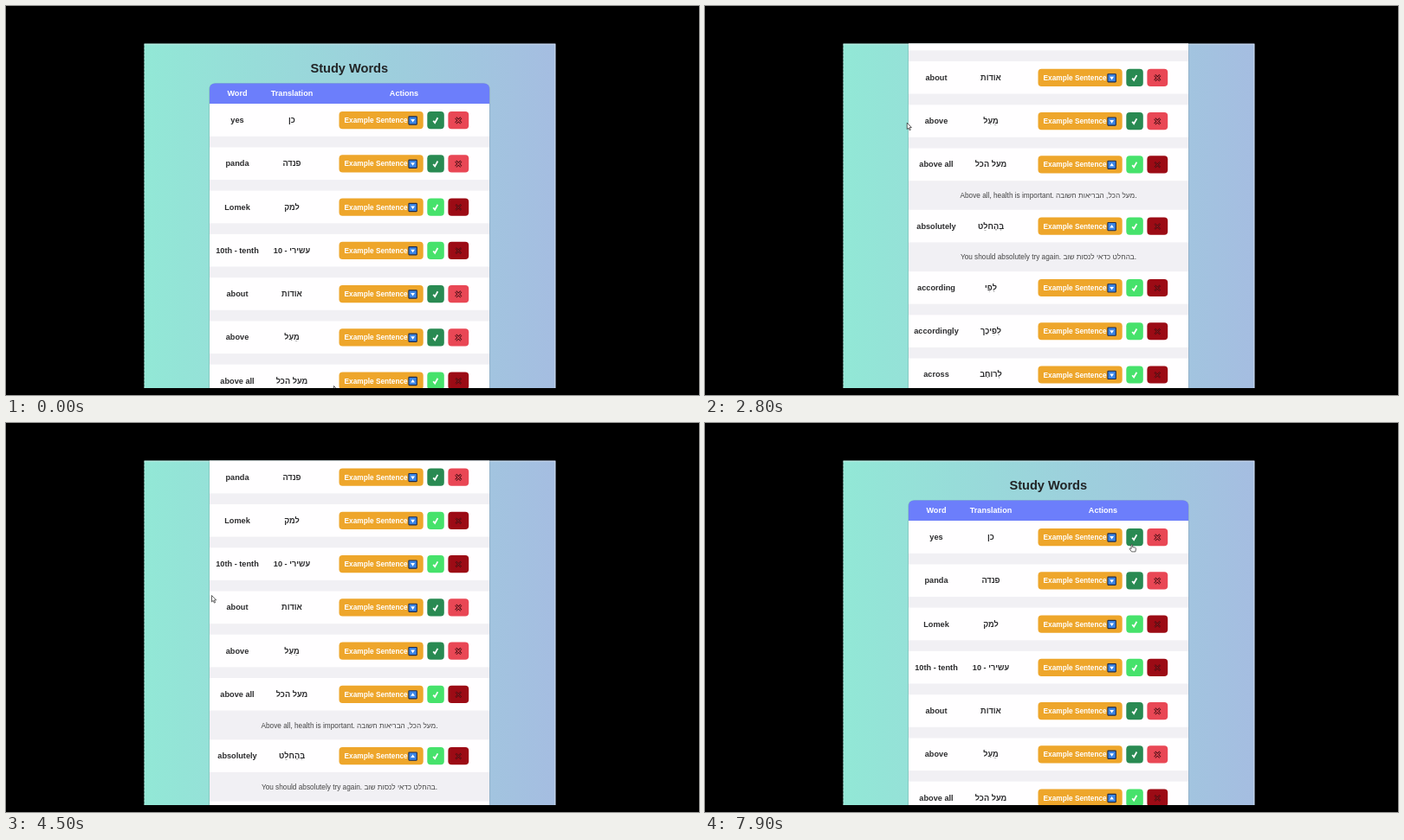
An HTML page that plays this animation: 800 px wide and 450 px high, repeating every 8 s.

```html
<!DOCTYPE html>
<html lang="en">
<head>
<meta charset="utf-8">
<title>Study Words</title>
<style>
  html, body { margin: 0; width: 100%; height: 100%; overflow: hidden; background: #000; }
  svg { display: block; width: 800px; height: 450px; }
  text { font: bold 9.2px "Liberation Sans", Arial, sans-serif; fill: #2b2b2d; text-anchor: middle; }
  .title { font-size: 14.6px; fill: #222426; }
  .head { font-size: 9.1px; fill: #fff; }
  .label { font-size: 8.27px; fill: #fff; text-anchor: start; }
  .sentence { font-size: 8.25px; font-weight: normal; fill: #444; }
</style>
</head>
<body>
<svg viewBox="0 0 800 450">
  <defs>
    <linearGradient id="sky">
      <stop offset="0" stop-color="#92e8d6"/>
      <stop offset="1" stop-color="#a5bde1"/>
    </linearGradient>
    <clipPath id="window"><rect x="159.5" y="43.5" width="475" height="398.5"/></clipPath>
  </defs>
  <g clip-path="url(#window)">
    <rect x="159" y="43" width="476" height="400" fill="url(#sky)"/>
    <g id="page">
      <text class="title" x="396.3" y="77">Study Words</text>
      <rect x="234.4" y="89.2" width="324.2" height="1200" rx="7" fill="#000" opacity=".16"/>
      <rect x="235" y="100" width="323" height="1200" fill="#f1f0f4"/>
      <path d="M235 113V96q0-6.5 6.5-6.5h310q6.5 0 6.5 6.5V113z" fill="#6c7efb"/>
      <text class="head" x="267" y="104.2">Word</text>
      <text class="head" x="330" y="104.2">Translation</text>
      <text class="head" x="459.5" y="104.2">Actions</text>
      <g id="rows"></g>
    </g>
    <path d="M159.5 44H634V442" fill="none" stroke="#fff" stroke-opacity=".55"/>
    <path d="M159.8 44V442" stroke="#fff" stroke-opacity=".5" stroke-dasharray="2 2"/>
    <g id="pointer" fill="#fff" stroke="#222" stroke-width=".7" stroke-linejoin="round">
      <path id="arrow" d="M0 0V7.4L1.7 5.9 2.9 8.6 4.1 8.1 2.9 5.4H5.2z"/>
      <path id="hand" d="M-.7 .5Q0-.6 .8 .5V3.2L3.9 3.9Q4.8 4.2 4.7 5.2L4.1 8.6H-.3L-2.6 5.4Q-2.6 4.2-1.5 4.6L-.7 5.3z"/>
    </g>
  </g>
</svg>
<script>
const LOOP = 8000, STEP = 100;
const ROW = 37.6, CLOSED = 12.65, OPEN = 33.7, FIRST = 113.2;

// word, translation, learned (bright green, dark red) or not
const words = [
  ['yes', 'כן', 0],
  ['panda', 'פנדה', 0],
  ['Lomek', 'למק', 1],
  ['10th - tenth', '10 - עשירי', 1],
  ['about', 'אוֹדוֹת', 0],
  ['above', 'מֵעַל', 0],
  ['above all', 'מעל הכל', 1],
  ['absolutely', 'בְּהֶחלֵט', 1],
  ['according', 'לְפִי', 1],
  ['accordingly', 'לְפִיכָך', 1],
  ['across', 'לְרוֹחָב', 1],
  ['additionally', 'בנוסף', 1],
  ['adjacent to', 'צמוד ל', 1],
  ['after', 'לְאַחַר', 1],
  ['after all', 'אחרי הכל', 0],
  ['afterwards', 'לְאַחַר מִכֵּן', 1],
  ['again', 'שׁוּב', 1],
  ['against', 'נֶגֶד', 1],
  ['ahead of', 'לִפנֵי', 1],
  ['albeit', 'אַף כִּי', 1]
];

// row index: sentence and the time span in which it is open
const examples = {
  0: ['yes, it is me', 6000, 7500],
  6: ['Above all, health is important. מעל הכל, הבריאות חשובה.', 0, LOOP],
  7: ['You should absolutely try again. בהחלט כדאי לנסות שוב.', 900, LOOP]
};

const scrollKeys = [[0, 0], [100, 0], [500, 208], [2500, 208], [2800, 250.2], [3300, 250.2],
  [3700, 708.6], [3800, 708.6], [4500, 119.7], [4800, 0]];
const pointerKeys = [[0, 378.5, 439.5], [100, 379, 440], [400, 430, 434], [800, 445, 300],
  [1000, 445, 299], [1200, 515, 420], [1700, 204, 70], [2500, 232.5, 116], [3300, 234.5, 167],
  [3800, 233.7, 196], [4500, 237.5, 199.5], [5300, 237.5, 199.5], [5900, 444, 133],
  [6500, 444.8, 132], [7500, 444.8, 132], [7900, 492.8, 140.3]];

const $ = id => document.getElementById(id);
const button = (x, w, fill) => `<rect x="${x}" y="-10" width="${w}" height="20.2" rx="4" fill="${fill}"/>`;
const cross = (color, width) =>
  `<path d="M519.2-2.7l6.2 6.2m0-6.2l-6.2 6.2" stroke="${color}" stroke-width="${width}"/>`;

function rowMarkup([word, translation, learned], i) {
  const sentence = examples[i]?.[0] ?? '';
  return `<g>
    <rect x="235" y="${-ROW / 2}" width="323" height="${ROW}" fill="#fffeff"/>
    <text x="267" y="3">${word}</text>
    <text x="330" y="3">${translation}</text>
    ${button(384.5, 97.2, '#eea62b')}
    <text class="label" x="390.6" y="3.1">Example Sentence</text>
    <rect x="464.9" y="-4.1" width="9.4" height="9.2" rx=".6" fill="#3a85e6" stroke="#1d2b4c" stroke-width="1.1"/>
    <path class="mark" fill="#fff"/>
    ${button(486.3, 19.5, learned ? '#46e26b' : '#298a52')}
    <path d="M493.2 .8l1.9 2.3 3.3-5.8" fill="none" stroke="#fff" stroke-width="1.8"/>
    ${button(510.4, 23.8, learned ? '#9c0b15' : '#e94755')}
    ${learned ? cross('#4a060b', 2) + cross('#a8262c', .7) : cross('#3c0b10', 2.8) + cross('#e94755', 1.1)}
    <text class="sentence" x="396.5" y="${ROW / 2 + 20}">${sentence}</text>
  </g>`;
}
$('rows').innerHTML = words.map(rowMarkup).join('');
const rows = [...$('rows').children];

function at(keys, t) {
  const n = keys.findIndex(k => k[0] > t);
  if (n < 0) return keys.at(-1).slice(1);
  const a = keys[n - 1], b = keys[n], p = (t - a[0]) / (b[0] - a[0]);
  return a.slice(1).map((v, i) => v + (b[i + 1] - v) * p);
}

function draw() {
  const t = Math.floor(performance.now() % LOOP / STEP) * STEP;
  const [scroll] = at(scrollKeys, t), [x, y] = at(pointerKeys, t);
  const overColumn = [[384, 482], [486, 506], [510, 534]].some(([l, r]) => x > l && x < r);
  let center = FIRST + ROW / 2, hover = false;

  rows.forEach((row, i) => {
    const [, from, to] = examples[i] ?? [];
    const open = t >= from && t < to;
    row.setAttribute('transform', `translate(0 ${center})`);
    row.querySelector('.mark').setAttribute('d', open ? 'M467.2 2h4.8l-2.4-3.6z' : 'M467.2-1h4.8l-2.4 3.6z');
    row.querySelector('.sentence').style.display = open ? '' : 'none';
    hover ||= overColumn && Math.abs(y + scroll - center) < 10;
    center += ROW + (open ? OPEN : CLOSED);
  });

  $('page').setAttribute('transform', `translate(0 ${-scroll})`);
  $('pointer').setAttribute('transform', `translate(${x} ${y})`);
  $('hand').style.display = hover ? '' : 'none';
  $('arrow').style.display = hover ? 'none' : '';
  requestAnimationFrame(draw);
}
draw();
</script>
</body>
</html>
```
